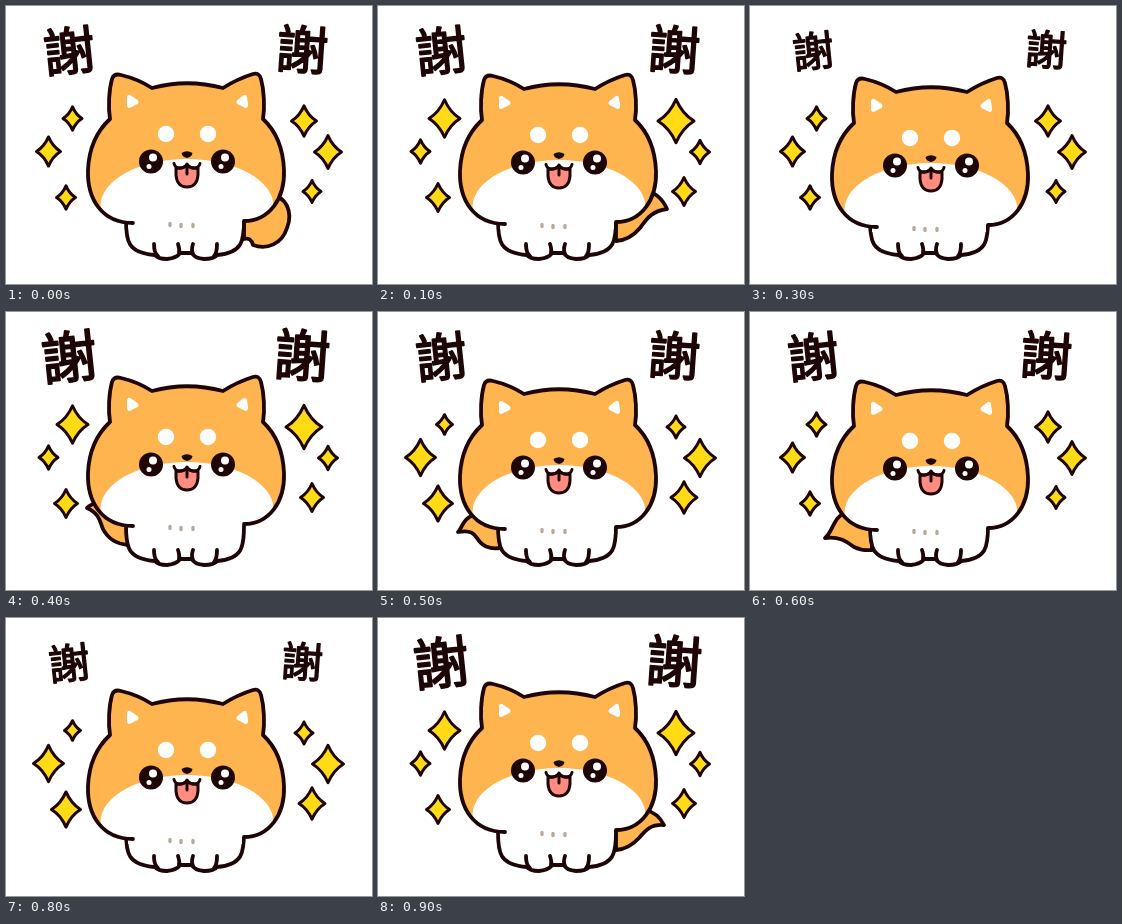
An HTML page for the animation above (1 s loop, 366 by 278 pixels).

```html
<!DOCTYPE html>
<html lang="zh-Hant">
<meta charset="utf-8">
<style>
html, body { margin: 0; width: 100%; height: 100%; overflow: hidden; background: #fff }
svg { display: block; width: 100%; height: 100% }
.line { stroke: #1e0606; stroke-width: 3.8; stroke-linecap: round; stroke-linejoin: round; fill: none }
.fur { fill: #ffb54f }
.white { fill: #fff }
.dark { fill: #1e0606 }
text { font: 300 52px "Noto Sans CJK TC", "Noto Sans CJK", sans-serif; text-anchor: middle; fill: #1e0606; stroke: #1e0606; stroke-width: 1.7; stroke-linecap: round; stroke-linejoin: round }
</style>
<svg viewBox="0 0 366 278">
  <defs>
    <path id="headShape" d="M127 217C96 217 81 193 82 164C83 140 91 125 104 113C102 101 103 84 106 73Q108 67 115 69Q132 73 146 82Q181 72.5 217 82Q231 73 247 68Q253 66 255 73C258 84 259 101 257 113C270 125 277 141 278 164C279 193 263 215 238 215"/>
    <clipPath id="face"><use href="#headShape"/></clipPath>
    <g id="eye">
      <circle class="dark" r="12"/>
      <circle class="white glint" r="4"/>
      <circle class="white glint" r="2.5"/>
    </g>
  </defs>
  <path id="tail" class="line fur"/>
  <path class="line white" d="M120 214C120 234 121 247 149 249Q152 253 161 253Q171 252 174 247H186Q188 252 198 253Q208 253 211 249C237 247 238 234 238 214"/>
  <path class="line" d="M148 238Q148 247 152 250M172 238Q174 244 173 248M187 238Q185 244 187 248M211 238Q211 247 208 250"/>
  <g id="head">
    <use href="#headShape" class="fur"/>
    <ellipse class="white" clip-path="url(#face)" cx="181" cy="200" rx="86.5" ry="47"/>
    <path class="white" d="M122 212H236V222H122Z"/>
    <use href="#headShape" class="line"/>
    <path class="white" d="M121 91Q122 87.5 125 89.5L131.5 94Q133.5 96 131.5 98L123.5 102Q120.5 102 121 98ZM241 91Q240 87.5 237 89.5L231.5 94Q229.5 96 231.5 98L239.5 102Q242.5 102 242 98Z"/>
    <circle class="white" cx="160" cy="128" r="8.2"/>
    <circle class="white" cx="202" cy="128" r="8.2"/>
    <use href="#eye" x="145" y="155.5"/>
    <use href="#eye" x="217" y="155.5"/>
    <path class="dark" d="M175.5 147Q181 143.5 186.5 147Q186 151 181 152Q176 151 175.5 147Z"/>
    <path class="line" style="fill:#ff8c80;stroke-width:3" d="M170 162V169Q171 181 181 181Q191 181 192 169V162Q185 163 181 159Q177 163 170 162Z"/>
    <path class="line" style="stroke-width:3" d="M168 157.5Q169 162 174 162Q179 162 181 158Q183 162 188 162Q193 162 194 157.5M181 160V168"/>
    <path d="M164 217.5V219.5M175 218.5V220.5M187 218.5V220.5" style="stroke:#b9aa9c;stroke-width:3.4;stroke-linecap:round"/>
  </g>
  <g id="stars"></g>
  <text>謝</text>
  <text>謝</text>
</svg>
<script>
const $ = s => document.querySelector(s), all = s => [...document.querySelectorAll(s)];

// Position of each star and its half width in the three twinkle states
const stars = [
  [66.5, 112.5, 11, 17, 9.5], [42.5, 145.5, 13.5, 11, 16.5], [60, 191.5, 11, 13, 16],
  [298, 115, 14, 19.5, 10.5], [322, 146, 15, 11, 17], [306, 185.5, 10.5, 13, 14.5]
];
$('#stars').innerHTML = stars.map(() => '<path class="line" style="fill:#ffdb16;stroke-width:3"/>').join('');
const starEls = all('#stars path'), words = all('text'), glints = all('.glint');

const twinkle = [0, 1, 2, 0, 1, 2, 0, 1, 2, 1];
const bob = [0, 1, 2.5, 4, -3];
const wordSize = [1, 1, 0, 0.8, 1.08];
const tails = [
  'M262 190C281 188 287 207 281 222C276 238 261 244 247 239Q245 231 238 233V205Z',
  'M266 184Q282 187 289 203C273 205 268 214 262 222Q252 234 238 235V205Z',
  'M271 180C280 182 287 186 291 197C275 197 271 207 265 215Q254 230 238 231V205Z',
  '',
  'M95 190Q84 192 81 196C94 202 94 210 97 217C102 227 112 232 122 233V205Z',
  'M97 203C85 205 84 217 80 220C96 217 97 224 102 230C107 236 114 237 122 236V205Z',
  'M96 200C83 205 83 220 75 226C90 224 97 230 104 235Q112 239 122 238V205Z',
  'M94 198C79 204 73 215 72 231C91 228 101 239 122 240V205Z',
  '',
  'M268 192Q280 195 286 207C272 206 267 213 261 220Q251 231 238 232V205Z'
];

function starPath(x, y, w) {
  const a = w - 1.5, b = w * 1.19 - 1.5, p = a * 0.34, q = b * 0.34;
  return `M${x} ${y - b}Q${x + p} ${y - q} ${x + a} ${y}Q${x + p} ${y + q} ${x} ${y + b}` +
    `Q${x - p} ${y + q} ${x - a} ${y}Q${x - p} ${y - q} ${x} ${y - b}Z`;
}

function place(el, x, y) {
  el.setAttribute('cx', x);
  el.setAttribute('cy', y);
}

function draw(now) {
  const step = Math.floor(now % 1000 / 100), beat = step % 5;
  $('#tail').setAttribute('d', tails[step]);
  $('#head').setAttribute('transform', `translate(0 ${bob[beat]})`);
  stars.forEach(([x, y, ...w], i) => starEls[i].setAttribute('d', starPath(x, y, w[twinkle[step]])));
  words.forEach((el, i) => {
    el.setAttribute('transform', `translate(${i ? 296 : 63} ${i ? 44 : 45.5}) rotate(${i ? 4 : -6}) scale(${wordSize[beat]}) translate(0 19)`);
  });
  const still = beat == 2;
  place(glints[0], still ? 0 : 2, -4);
  place(glints[1], still ? 0 : -2, 5);
  requestAnimationFrame(draw);
}
draw(performance.now());
</script>
</html>
```
